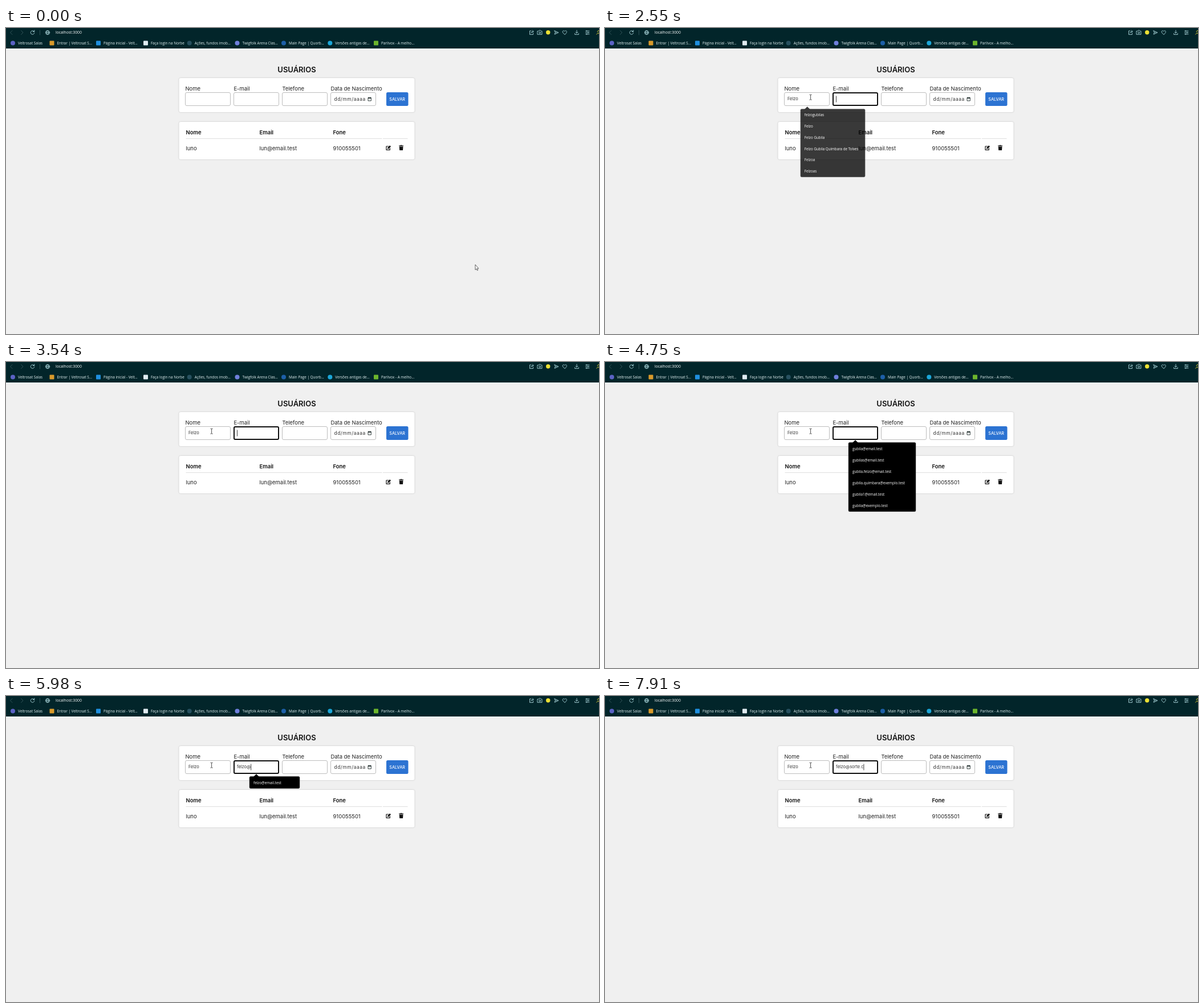
These frames come from a looping animation (1040x538 px, 8 s). An HTML page:

```html
<!DOCTYPE html>
<html lang="pt">
<head>
<meta charset="utf-8">
<style>
  html, body { margin: 0; width: 100%; height: 100%; overflow: hidden; background: #f0f0f0 }
  svg { display: block }
  text { font-family: Inter, sans-serif; font-size: 9.45px; fill: #222; white-space: pre }
  .bar text, .popup text { font-family: "Open Sans", sans-serif; font-size: 6.35px; fill: #e4f1f2 }
  .popup text { fill: #fff }
  .bar .url { font-size: 6.8px; fill: #fff }
  .line { fill: none; stroke: #a9d3d8; stroke-width: .9; stroke-linecap: round; stroke-linejoin: round }
  .dim { stroke: #35575c }
  .bold { font-weight: 600; fill: #111 }
  .card { fill: #fff; filter: drop-shadow(0 0 1.2px #bbb) }
  .field { fill: #fff; stroke: #bdbdbd }
  .focus { fill: #fff; stroke: #101010; stroke-width: 2 }
  .typed { font-size: 7.4px; fill: #333 }
</style>
</head>
<body>
<svg width="1040" height="538" viewBox="0 0 1040 538">
  <rect width="1040" height="538" fill="#f0f0f0"/>
  <g class="bar">
    <rect width="1040" height="36" fill="#02252a"/>
    <g class="line">
      <path class="dim" d="M11 4.5L7.5 8L11 11.5M26.5 4.5L30 8L26.5 11.5M59.5 4V12"/>
      <path d="M49 5.8A3.3 3.3 0 1 0 49.8 8.5M49.8 4V6.5H47.3"/>
      <circle cx="73" cy="8" r="3.6"/>
      <ellipse cx="73" cy="8" rx="1.6" ry="3.6"/>
      <path d="M69.4 8H76.6"/>
      <path d="M921 5H918.5V11.5H924.5V9M920.5 9Q921 6 925 6M923.2 4L925.2 6L923.2 8"/>
      <path d="M932.3 5.5H934L935 4.2H937.5L938.5 5.5H940V11.3H932.3Z"/>
      <circle cx="936.2" cy="8.3" r="1.5"/>
      <path d="M962 4.8L969 8L962 11.2L963.3 8ZM963.3 8H966"/>
      <path d="M979.8 11.5L976.5 8C975 5.5 978 3.5 979.8 5.8C981.6 3.5 984.6 5.5 983.1 8Z"/>
      <path d="M1001 4V9M999 7.2L1001 9.2L1003 7.2M997.7 9.5V11.5H1004.3V9.5"/>
      <path d="M1016.5 5.2H1023M1016.5 8H1023M1016.5 10.8H1023M1018.5 4.5V6M1021 7.2V8.8M1018.5 10V11.6"/>
    </g>
    <circle cx="950.7" cy="7.8" r="3.7" fill="#ece034"/>
    <path d="M1035.5 11.5Q1037 8.5 1040 9M1040 4.8A2 2 0 0 0 1037.500 7.500" fill="none" stroke="#d9cb30"/>
    <text class="url" x="87" y="10.4">localhost:3000</text>
    <g id="bookmarks"></g>
  </g>

  <text class="bold" x="510" y="77.6" text-anchor="middle" style="font-size:13px">USUÁRIOS</text>
  <rect class="card" x="303.5" y="88" width="413" height="60" rx="3"/>
  <rect class="card" x="303.5" y="165" width="413" height="66" rx="3"/>
  <g id="form"></g>
  <text x="575.5" y="127.6" style="font-size:8.4px;letter-spacing:.55px;fill:#333">dd/mm/aaaa</text>
  <path d="M635 122.5H640.3V128H635ZM635 123.5H640.3M636.2 121.5V123M639.2 121.5V123" fill="none" stroke="#1d2b2a" stroke-width=".9"/>
  <rect x="667" y="113" width="38.5" height="24" rx="2.5" fill="#2c73d2"/>
  <text x="686.1" y="127.5" text-anchor="middle" style="font-size:7.2px;font-weight:500;fill:#fff">SALVAR</text>

  <text class="bold" x="315.5" y="187.3">Nome</text>
  <text class="bold" x="444.5" y="187.3">Email</text>
  <text class="bold" x="573.5" y="187.3">Fone</text>
  <path d="M315.5 194.5H659.5M661 194.5H704.5" stroke="#dedede"/>
  <text x="315.5" y="215">luno</text>
  <text x="444.5" y="215">lun@email.test</text>
  <text x="573.5" y="215">910055501</text>
  <path d="M671.5 208H667V214.3H673.3V211" fill="none" stroke="#111" stroke-width="1.2" stroke-linejoin="round"/>
  <path d="M669 212.5L669.3 210.5L673.2 206.6L675 208.4L671.1 212.2Z" fill="#111"/>
  <path d="M689.2 206.5H691.5L692 205.8H694L694.5 206.5H697V207.8H689.2ZM689.7 208.4H696.5L696 215H690.2Z" fill="#111"/>
  <g id="live"></g>
</svg>
<script>
const LOOP = 8000, BLINK = 520, FADE = 180;
const $ = id => document.getElementById(id);
const pen = document.createElement('canvas').getContext('2d');
const text = (x, y, s, cls = '') => `<text class="${cls}" x="${x}" y="${y}">${s}</text>`;
const box = (x, y, w, h, r, attr) => `<rect x="${x}" y="${y}" width="${w}" height="${h}" rx="${r}" ${attr}/>`;

// Bookmarks: icon centre, title, colour, round icon
$('bookmarks').innerHTML = [
  [12, 'Veltrosat Salas', '#5b62c4', 1],
  [80.5, 'Entrar | Veltrosat S...', '#d99a2b', 0],
  [162, 'Página inicial - Velt...', '#1f8fdf', 0],
  [245, 'Faça login na Norbe', '#dfeaf0', 0],
  [321.7, 'Ações, fundos imob...', '#27505f', 1],
  [405.5, 'Twigfolk Arena Clas...', '#6f7fdc', 1],
  [487, 'Main Page | Quorb...', '#1d5fa8', 1],
  [568.3, 'Versões antigas de...', '#1ba6d8', 1],
  [649, 'Parlivox - A melho...', '#6cb52d', 0]
].map(([x, title, color, round]) =>
  box(x - 4, 22.5, 8, 8, round ? 4 : 1, `fill="${color}"`) + text(x + 9, 28.7, title)).join('');

const fieldX = i => 314 + 85 * i;
$('form').innerHTML = ['Nome', 'E-mail', 'Telefone', 'Data de Nascimento'].map((label, i) =>
  text(fieldX(i) + .4, 109.7, label) + box(fieldX(i) + .5, 113.5, 79, 23, 2.5, 'class="field"')).join('');

// Each entry: time and field value from then on
const typing = [
  [[525, ''], [1820, 'F'], [2030, 'Fe'], [2140, 'Fel'], [2230, 'Felz'], [2380, 'Felzo']],
  [[2495, ''], [3610, 'g'], [3700, 'gu'], [3870, 'gub'], [4040, 'gubi'], [4250, 'gubil'], [4350, 'gubila'],
   [4750, ''], [4970, 'f'], [5130, 'fe'], [5250, 'fel'], [5410, 'felz'], [5570, 'felzo'], [5980, 'felzo@'],
   [6440, 'felzo@s'], [6600, 'felzo@so'], [6800, 'felzo@sor'], [6970, 'felzo@sort'], [7100, 'felzo@sorte'],
   [7810, 'felzo@sorte.'], [7910, 'felzo@sorte.c']]
];

const popups = [
  { from: 570, to: 1850, field: 0, width: 88,
    rows: ['felzogubilas', 'aasasasd', 'a', 'Felzo', 'Felzo Gubila', 'aasas'] },
  { from: 1850, to: 2510, field: 0, width: 115, fade: true,
    rows: ['felzogubilas', 'Felzo', 'Felzo Gubila', 'Felzo Gubila Quimbara de Tolves', 'Felzoa', 'Felzoas'] },
  { from: 3640, to: 4750, field: 1, width: 118, fade: true,
    rows: ['gubila@email.test', 'gubilas@email.test', 'gubila.felzo@email.test',
           'gubila.quimbara@exemplo.test', 'gubila1@email.test', 'gubila@exemplo.test'] },
  { from: 4970, to: 5250, field: 1, width: 114,
    rows: ['felzo@email.test', 'felzogubilas@email.test', 'felzoa@email.test',
           'felzoquimbara@exemplo.test', 'fa@email.test', 'fe@email.test'] },
  { from: 5250, to: 5980, field: 1, width: 106,
    rows: ['felzo@email.test', 'felzogubilas@email.test', 'felzoa@email.test', 'felzogubila@exemplo.test'] },
  { from: 5980, to: 6440, field: 1, width: 88, fade: true, rows: ['felzo@email.test'] }
];

function drawPopup({ from, to, field, width, rows, fade }, t) {
  if (t < from || t >= to + (fade ? FADE : 0)) return '';
  const gone = Math.max(0, (t - to) / FADE);
  const x = fieldX(field) + 28, height = 20.1 * rows.length + .8;
  const cx = x + width / 2, cy = 141.5 + height / 2;
  return `<g class="popup" opacity="${1 - gone}" transform="translate(${cx} ${cy}) scale(${1 - .07 * gone}) translate(${-cx} ${-cy})">` +
    box(x, 141.5, width, height, 2, 'stroke="#333" stroke-width=".5"') +
    `<path d="M${x + 7} 142L${x + 12} 137.3L${x + 17} 142Z"/>` +
    rows.map((row, i) => text(x + 7, 154.6 + 20.1 * i, row)).join('') + '</g>';
}

function drawField(i, t) {
  const state = typing[i].filter(([time]) => time <= t).pop();
  if (!state) return '';
  const [time, value] = state, x = fieldX(i) + 6;
  const focused = i === (t < 2495 ? 0 : 1);
  const cleared = t >= 4750 && t < 4970;
  const lit = Math.floor((t - time) / BLINK) % 2 === 0;
  let out = focused ? box(fieldX(i) + 1, 114, 78, 22, 2, 'class="focus"') : '';
  out += text(x, 127.4, value, 'typed');
  if (focused && lit && !cleared) {
    pen.font = '7.4px Inter, sans-serif';
    const caret = x + .5 + pen.measureText(value).width;
    out += `<path d="M${caret} 119.5V130.5" stroke="#111" stroke-width=".8"/>`;
  }
  return out;
}

function drawCursor(t) {
  const clamp = v => Math.min(1, Math.max(0, v));
  const u = clamp((t - 20) / 370), ease = u * u * (3 - 2 * u);
  const settle = clamp((t - 390) / 110);
  const x = 823 - 462 * ease - .4 * settle, y = 416 - 309 * ease + 14.7 * settle;
  const shape = u < 1
    ? '<path d="M0 0V9.2L2 7.4L3.4 10.3L4.7 9.7L3.4 6.8H5.9Z" fill="#fff" stroke="#222" stroke-width=".7"/>'
    : '<path d="M-2 -4.5H-.5L0 -4L.5 -4.5H2M0 -4V4M-2 4.5H-.5L0 4L.5 4.5H2" fill="none" stroke="#222" stroke-width=".8"/>';
  return `<g transform="translate(${x} ${y})">${shape}</g>`;
}

function frame() {
  const t = performance.now() % LOOP;
  $('live').innerHTML = drawField(0, t) + drawField(1, t) +
    popups.map(p => drawPopup(p, t)).join('') + drawCursor(t);
  requestAnimationFrame(frame);
}
frame();
</script>
</body>
</html>
```
